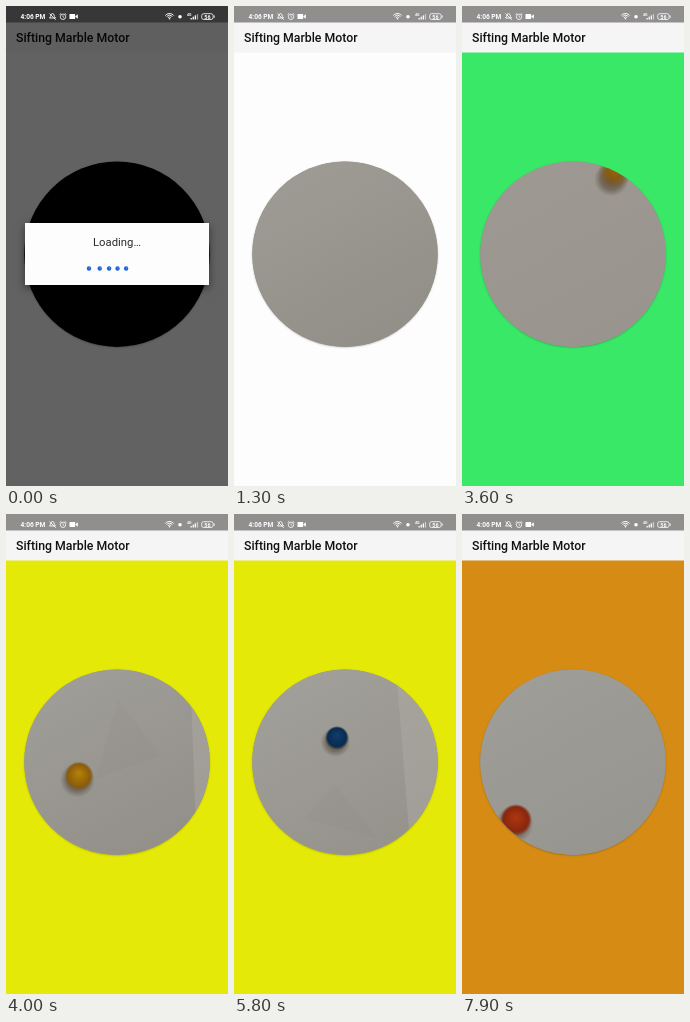
Animation, 222 px wide and 480 px high, one loop 8 s. Source, as an HTML page with a canvas:

```html
<!DOCTYPE html>
<html lang="en">
<head>
<meta charset="utf-8">
<style>
html, body { margin: 0; width: 100%; height: 100%; overflow: hidden; background: #fdfdfd; }
canvas { display: block; width: 222px; height: 480px; }
</style>
</head>
<body>
<canvas id="stage"></canvas>
<script>
const W = 222, H = 480, LOOP = 8000, STEP = 100;
const CX = 111, CY = 248.2, R = 92.7;
const FONT = 'Roboto, "Open Sans", sans-serif';
const canvas = document.getElementById('stage');
const ctx = canvas.getContext('2d');
const dpr = window.devicePixelRatio || 1;
canvas.width = W * dpr;
canvas.height = H * dpr;

// Page colour from each moment on
const PAGES = [[0, '#fdfdfd'], [2300, '#39e866'], [3900, '#e5e907'], [6000, '#1d57d8'], [7500, '#d68c14']];

// Camera tone: time, upper left, lower right
const TONES = [
  [1000, [158, 155, 148], [146, 143, 136]],
  [2200, [158, 155, 148], [146, 143, 136]],
  [3600, [157, 153, 146], [153, 149, 142]],
  [4000, [159, 157, 152], [147, 144, 138]],
  [5800, [161, 159, 153], [150, 147, 141]],
  [7900, [159, 157, 152], [151, 149, 144]]
];

// Each bead's start, radius, light and dark colours
const BEADS = [
  { start: 1600, r: 12, light: [22, 90, 20], dark: [10, 54, 12] },
  { start: 3500, r: 13.5, light: [182, 130, 8], dark: [128, 84, 12] },
  { start: 5500, r: 11, light: [16, 62, 108], dark: [10, 38, 72] },
  { start: 7000, r: 15, light: [172, 56, 18], dark: [128, 34, 10] }
];
const PATH = [[0, 172, 140], [100, 153, 166], [300, 103, 224], [500, 73, 262],
  [600, 69, 269], [750, 66, 275], [900, 54, 306], [1050, 36, 352]];

const clamp = v => Math.max(0, Math.min(1, v));
const mix = (a, b, k) => a + (b - a) * k;
const mixAll = (a, b, k) => a.map((v, i) => mix(v, b[i], k));
const rgba = (c, a = 1) => `rgba(${c.map(Math.round).join(',')},${a})`;

function segment(keys, t) {
  let i = 0;
  while (i < keys.length - 2 && t >= keys[i + 1][0]) i++;
  const a = keys[i], b = keys[i + 1];
  return [a, b, clamp((t - a[0]) / (b[0] - a[0]))];
}

function disc(x, y, r, fill) {
  ctx.fillStyle = fill;
  ctx.beginPath();
  ctx.arc(x, y, r, 0, Math.PI * 2);
  ctx.fill();
}

function box(x, y, w, h, fill) {
  ctx.fillStyle = fill;
  ctx.fillRect(x, y, w, h);
}

function line(width, color, ...pts) {
  ctx.lineWidth = width;
  ctx.strokeStyle = color;
  ctx.beginPath();
  pts.forEach(([x, y], i) => i ? ctx.lineTo(x, y) : ctx.moveTo(x, y));
  ctx.stroke();
}

function shape(fill, ...pts) {
  ctx.fillStyle = fill;
  ctx.beginPath();
  pts.forEach(([x, y], i) => i ? ctx.lineTo(x, y) : ctx.moveTo(x, y));
  ctx.fill();
}

function label(str, x, y, size, weight, fill, align = 'left') {
  ctx.font = `${weight} ${size}px ${FONT}`;
  ctx.textAlign = align;
  ctx.fillStyle = fill;
  ctx.fillText(str, x, y);
}

function softDisc(x, y, r, color, alpha) {
  const g = ctx.createRadialGradient(x, y, 0, x, y, r);
  g.addColorStop(0, rgba(color, alpha));
  g.addColorStop(0.6, rgba(color, alpha * 0.7));
  g.addColorStop(1, rgba(color, 0));
  disc(x, y, r, g);
}

function drawBead(b, t) {
  const u = t - b.start;
  if (u < 0 || u > 1050) return;
  const [p, q, k] = segment(PATH, u);
  const x = mix(p[1], q[1], k), y = mix(p[2], q[2], k);
  const blur = clamp((250 - u) / 150);
  softDisc(x - 1.5 - 2 * blur, y + 4 + 3 * blur, b.r + 4, [74, 58, 40], 0.7);
  const r = b.r + 1 + 2 * blur;
  const g = ctx.createRadialGradient(x, y - 3, 0, x, y, r);
  g.addColorStop(0, rgba(mixAll(b.light, b.dark, blur * 0.6)));
  g.addColorStop(0.78 - 0.4 * blur, rgba(mixAll(b.light, b.dark, 0.8)));
  g.addColorStop(1, rgba(b.dark, 0));
  disc(x, y, r, g);
}

function drawCamera(t) {
  ctx.save();
  ctx.shadowColor = 'rgba(0,0,0,.25)';
  ctx.shadowBlur = 2 * dpr;
  ctx.shadowOffsetY = 0.6 * dpr;
  disc(CX, CY, R, t < 1000 ? '#000' : '#99968f');
  ctx.restore();
  if (t < 1000) return;

  ctx.save();
  ctx.beginPath();
  ctx.arc(CX, CY, R, 0, Math.PI * 2);
  ctx.clip();
  const [a, b, k] = segment(TONES, t);
  const g = ctx.createLinearGradient(60, 165, 150, 335);
  g.addColorStop(0, rgba(mixAll(a[1], b[1], k)));
  g.addColorStop(1, rgba(mixAll(a[2], b[2], k)));
  box(18, 155, 187, 187, g);

  // Paper edge and faint crease
  const seen = clamp((t - 3700) / 200) * clamp((6500 - t) / 400);
  if (seen) {
    const s = clamp((t - 4000) / 1800);
    const top = mix(184, 162, s), low = mix(191, 177, s);
    ctx.globalAlpha = seen;
    shape('rgba(182,179,170,.35)', [top, 155], [low, 342], [205, 342], [205, 155]);
    shape('rgba(110,106,100,.05)', [mix(112, 100, s), mix(185, 270, s)],
      [mix(155, 145, s), mix(242, 325, s)], [mix(90, 70, s), mix(265, 305, s)]);
    ctx.globalAlpha = 1;
  }
  for (const bead of BEADS) drawBead(bead, t);
  ctx.restore();
}

// Fast in, slow through the middle, fast out
const hesitate = x => x < 0.5 ? Math.sqrt(2 * x) / 2 : 1 - Math.sqrt(2 * (1 - x)) / 2;

function drawDialog(t) {
  const alpha = clamp((400 - t) / 200);
  if (!alpha) return;
  ctx.save();
  ctx.globalAlpha = alpha;
  ctx.shadowColor = 'rgba(0,0,0,.5)';
  ctx.shadowBlur = 8 * dpr;
  ctx.shadowOffsetY = 3 * dpr;
  box(19, 217, 184, 62, '#fdfdfd');
  ctx.shadowColor = 'transparent';
  label('Loading…', 111, 239.5, 11.3, 400, '#2b2b2b', 'center');
  for (let i = 0; i < 5; i++) {
    const x = 0.242 + 0.088 * i + t / 1500;
    if (x > 1) continue;
    const px = 19 + 184 * hesitate(x);
    disc(px, 262.5, 2.2, '#1764dc');
    disc(px + 0.5, 262, 0.6, '#8ab8f5');
  }
  ctx.restore();
}

function drawStatus() {
  const ink = '#fff';
  label('4:06 PM', 14.5, 13, 6.6, 700, ink);

  // Muted bell
  line(0.9, ink, [43.5, 12], [44.6, 10.5], [45, 8.5], [46.5, 7.5], [48, 8.5], [48.4, 10.5], [49.5, 12], [43.5, 12]);
  line(0.8, ink, [43.5, 7.5], [49.8, 13.8]);

  // Alarm clock
  ctx.lineWidth = 0.8;
  ctx.beginPath();
  ctx.arc(57, 10.8, 2.7, 0, Math.PI * 2);
  ctx.stroke();
  line(0.7, ink, [57, 9.3], [57, 11], [58.2, 11.6]);
  line(0.8, ink, [53.6, 8.6], [55.2, 7.3]);
  line(0.8, ink, [58.8, 7.3], [60.4, 8.6]);

  // Video
  box(63.5, 8, 5.6, 5, ink);
  shape(ink, [69, 10.5], [71.8, 8.2], [71.8, 12.8]);

  // Wireless
  for (const r of [2, 3.8, 5.5]) {
    ctx.lineWidth = 0.9;
    ctx.beginPath();
    ctx.arc(163.5, 13, r, -Math.PI * 0.78, -Math.PI * 0.22);
    ctx.stroke();
  }
  disc(163.5, 12.8, 0.8, ink);
  disc(174, 10.7, 1.8, ink);

  // Signal
  label('4G', 181, 9.5, 3.6, 700, ink);
  for (let i = 0; i < 4; i++) box(184.5 + i * 2.1, 12 - i * 1.3, 1.3, 1.5 + i * 1.3, i < 3 ? ink : 'rgba(255,255,255,.55)');

  // Battery
  ctx.lineWidth = 0.8;
  ctx.beginPath();
  ctx.roundRect(195.7, 7.7, 11.4, 5.8, 2);
  ctx.stroke();
  box(207.7, 9.4, 0.9, 2.4, ink);
  label('56', 201.4, 12.6, 5.4, 700, ink, 'center');
}

function draw(t) {
  ctx.setTransform(dpr, 0, 0, dpr, 0, 0);
  box(0, 0, W, H, PAGES.filter(p => t >= p[0]).pop()[1]);
  box(0, 0, W, 46.5, '#f5f5f5');
  label('Sifting Marble Motor', 10, 36, 12.3, 500, '#111');
  drawCamera(t);
  box(0, 0, W, 16.5, '#918e8e');
  const dim = 0.61 * clamp((500 - t) / 300);
  if (dim) box(0, 0, W, H, `rgba(0,0,0,${dim})`);
  drawStatus();
  drawDialog(t);
}

let begin;
function tick(now) {
  begin ??= now;
  draw(Math.floor((now - begin) % LOOP / STEP) * STEP);
  requestAnimationFrame(tick);
}
draw(0);
requestAnimationFrame(tick);
</script>
</body>
</html>
```
